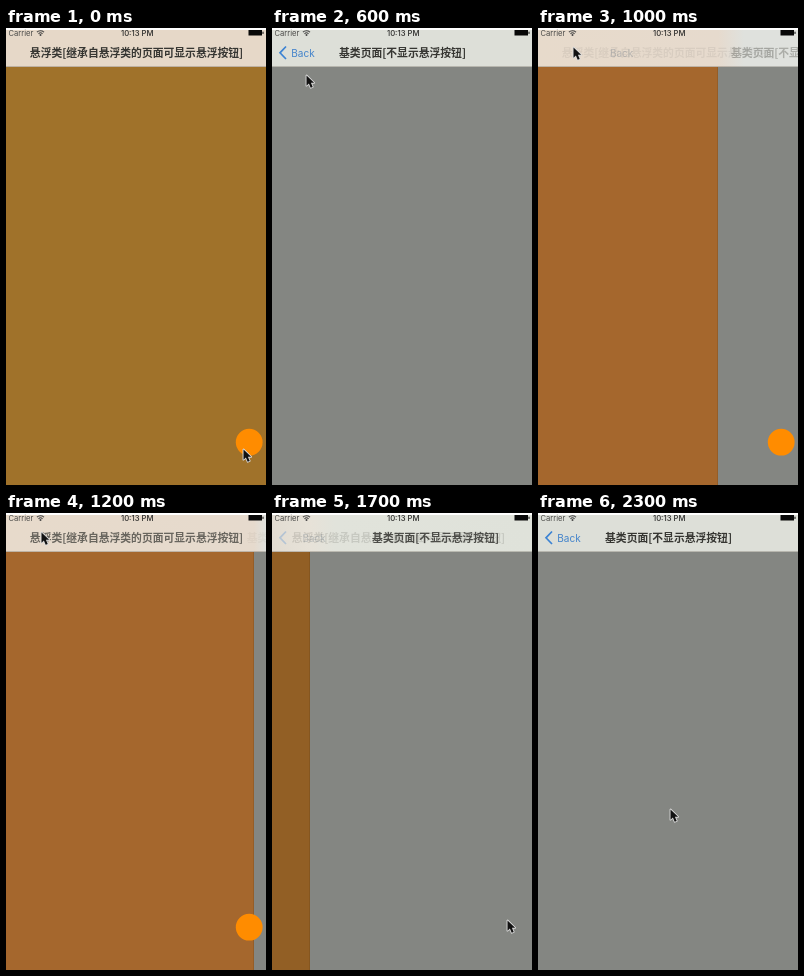
Write an HTML page with a canvas that moves like this. It is 260 px wide and 457 px high and loops after 2400 ms.

```html
<!DOCTYPE html>
<html lang="zh-CN">
<head>
<meta charset="utf-8">
<title>Floating button</title>
<style>
html, body { margin: 0; width: 100%; height: 100%; overflow: hidden; background: #fff; }
canvas { display: block; width: 260px; height: 457px; }
</style>
</head>
<body>
<canvas id="stage"></canvas>
<script>
const W = 260, H = 457, BAR = 39, LOOP = 2400, STEP = 100;
const canvas = document.getElementById('stage');
const ctx = canvas.getContext('2d');
const dpr = window.devicePixelRatio || 1;
canvas.width = W * dpr;
canvas.height = H * dpr;

const HOME = '悬浮类[继承自悬浮类的页面可显示悬浮按钮]';
const BASE = '基类页面[不显示悬浮按钮]';
const TITLE_FONT = '700 10.8px "Noto Sans CJK SC", "Noto Sans CJK", sans-serif';
const UI = 'Inter, "Liberation Sans", sans-serif';
const INK = '#363632', GRAY = '#848682', BROWN = '#a0722a';

// Page transitions: visible from `from`, eased as if begun at `start`.
const moves = [
  { from: 100, start: 60, push: true, brown: '#906425' },
  { from: 800, start: 800, push: false, brown: '#a5672d' },
  { from: 1700, start: 1417, push: true, brown: '#925f25' }
];

// Pointer stops: time, x, y
const stops = [
  [0, 237.5, 421.5], [300, 238, 418], [600, 34.5, 47.5], [800, 35.5, 19.5], [1200, 35.5, 19.5],
  [1500, 243.5, 414], [1600, 243.5, 414], [1700, 235.5, 407.5], [2200, 130.5, 296], [2300, 132.5, 296.5]
];

const lerp = (a, b, k) => a + (b - a) * k;

function settle(ms) {
  const x = Math.max(0, ms) * 0.012;
  const left = (1 + x) * Math.exp(-x);
  return left < 0.02 ? 0 : left;
}

function pointerAt(t) {
  let i = 0;
  while (i < stops.length - 2 && t > stops[i + 1][0]) i++;
  const a = stops[i], b = stops[i + 1];
  const k = (t - a[0]) / (b[0] - a[0]);
  return [lerp(a[1], b[1], k), lerp(a[2], b[2], k)];
}

// edge: left side of the gray page
function sceneAt(t) {
  const move = moves.filter(m => t >= m.from).pop();
  if (!move) return { edge: W, push: false, brown: BROWN, button: true };
  const left = settle(t - move.start);
  const edge = Math.round(W * (move.push ? left : 1 - left));
  return {
    edge,
    push: move.push,
    brown: edge === W ? BROWN : move.brown,
    button: !move.push
  };
}

function rect(color, x, y, w, h) {
  ctx.fillStyle = color;
  ctx.fillRect(x, y, w, h);
}

function label(str, x, y, font, color, alpha = 1, align = 'left') {
  ctx.globalAlpha = alpha;
  ctx.font = font;
  ctx.fillStyle = color;
  ctx.textAlign = align;
  ctx.fillText(str, x, y);
  ctx.globalAlpha = 1;
}

function pages(s) {
  rect(s.brown, 0, BAR, s.edge, H - BAR);
  rect(GRAY, s.edge, BAR, W - s.edge, H - BAR);
  if (s.edge < W) rect('rgba(60,40,10,.15)', s.edge - 1, BAR, 1, H - BAR);
}

function barFill(s) {
  if (s.edge >= W) return '#e6d8c8';
  if (s.edge <= 0) return '#dddfd8';
  const k = s.edge / W;
  const g = ctx.createLinearGradient(0, 0, W, 0);
  g.addColorStop(0, s.push ? '#e2dcd2' : '#e7dacb');
  g.addColorStop(k, s.push ? '#e7e2d8' : '#e6dacd');
  g.addColorStop(Math.min(1, k + 0.1), s.push ? '#e1e3db' : '#dfe1dd');
  g.addColorStop(1, s.push ? '#dfe2da' : '#dfe1dd');
  return g;
}

function chevron(alpha) {
  ctx.globalAlpha = alpha;
  ctx.strokeStyle = '#3c83d3';
  ctx.lineWidth = 1.7;
  ctx.beginPath();
  ctx.moveTo(14, 18.5);
  ctx.lineTo(8, 24.8);
  ctx.lineTo(14, 31);
  ctx.stroke();
  ctx.globalAlpha = 1;
}

function navBar(s) {
  rect(barFill(s), 0, 0, W, BAR);
  rect('rgba(70,60,50,.25)', 0, BAR - 1, W, 1);
  rect('#fff', 0, 0, W, 2);

  const k = s.edge / W;
  if (k > 0) {
    const shift = k < 1 && s.push ? 4 : 0;
    const alpha = s.push ? Math.max(0.15, k ** 3) : k ** 7;
    label(HOME, 130.5 - shift, 28.8, TITLE_FONT, INK, alpha, 'center');
  }
  if (k < 1) {
    const slide = s.edge * (s.push ? 0.87 : 0.7);
    label(BASE, 130.5 + slide, 28.8, TITLE_FONT, INK, 1 - k, 'center');
    const fade = (1 - k) ** 8;
    chevron(fade);
    label('Back', 19.3 + 76 * k, 28.6, '10px ' + UI,
      k > 0 ? '#56667a' : '#4484cb', s.push ? fade : 1 - k);
  }
}

function wifi(x, y) {
  ctx.strokeStyle = '#444';
  ctx.lineWidth = 1.1;
  for (const r of [2.7, 4.9]) {
    ctx.beginPath();
    ctx.arc(x, y, r, -Math.PI * 0.76, -Math.PI * 0.24);
    ctx.stroke();
  }
  ctx.fillStyle = '#444';
  ctx.beginPath();
  ctx.arc(x, y - 0.5, 1, 0, Math.PI * 2);
  ctx.fill();
}

function statusBar() {
  label('Carrier', 2.5, 7.7, '7.6px ' + UI, '#4a4a48');
  wifi(34.5, 7.6);
  label('10:13 PM', 131.2, 7.7, '500 7.7px ' + UI, '#2c2c2b', 1, 'center');
  rect('#080808', 242.5, 2, 13.5, 5.5);
  rect('#080808', 256.5, 3.7, 1, 2.2);
}

function floatButton() {
  ctx.fillStyle = '#ff8c00';
  ctx.beginPath();
  ctx.arc(243.2, 414.2, 13.4, 0, Math.PI * 2);
  ctx.fill();
}

const arrow = new Path2D('M0 0V10.2L2.4 8L4.2 12.2L6.2 11.4L4.4 7.3H7.6Z');

function pointer([x, y]) {
  ctx.save();
  ctx.translate(x, y);
  ctx.lineJoin = 'round';
  ctx.strokeStyle = '#dcdcdc';
  ctx.lineWidth = 1.8;
  ctx.stroke(arrow);
  ctx.fillStyle = '#121212';
  ctx.fill(arrow);
  ctx.restore();
}

function draw(now) {
  const t = Math.floor((now % LOOP) / STEP) * STEP;
  const s = sceneAt(t);
  ctx.setTransform(dpr, 0, 0, dpr, 0, 0);
  pages(s);
  navBar(s);
  statusBar();
  if (s.button) floatButton();
  pointer(pointerAt(t));
}

const begin = performance.now();
function tick() {
  draw(performance.now() - begin);
  requestAnimationFrame(tick);
}
tick();
</script>
</body>
</html>
```
